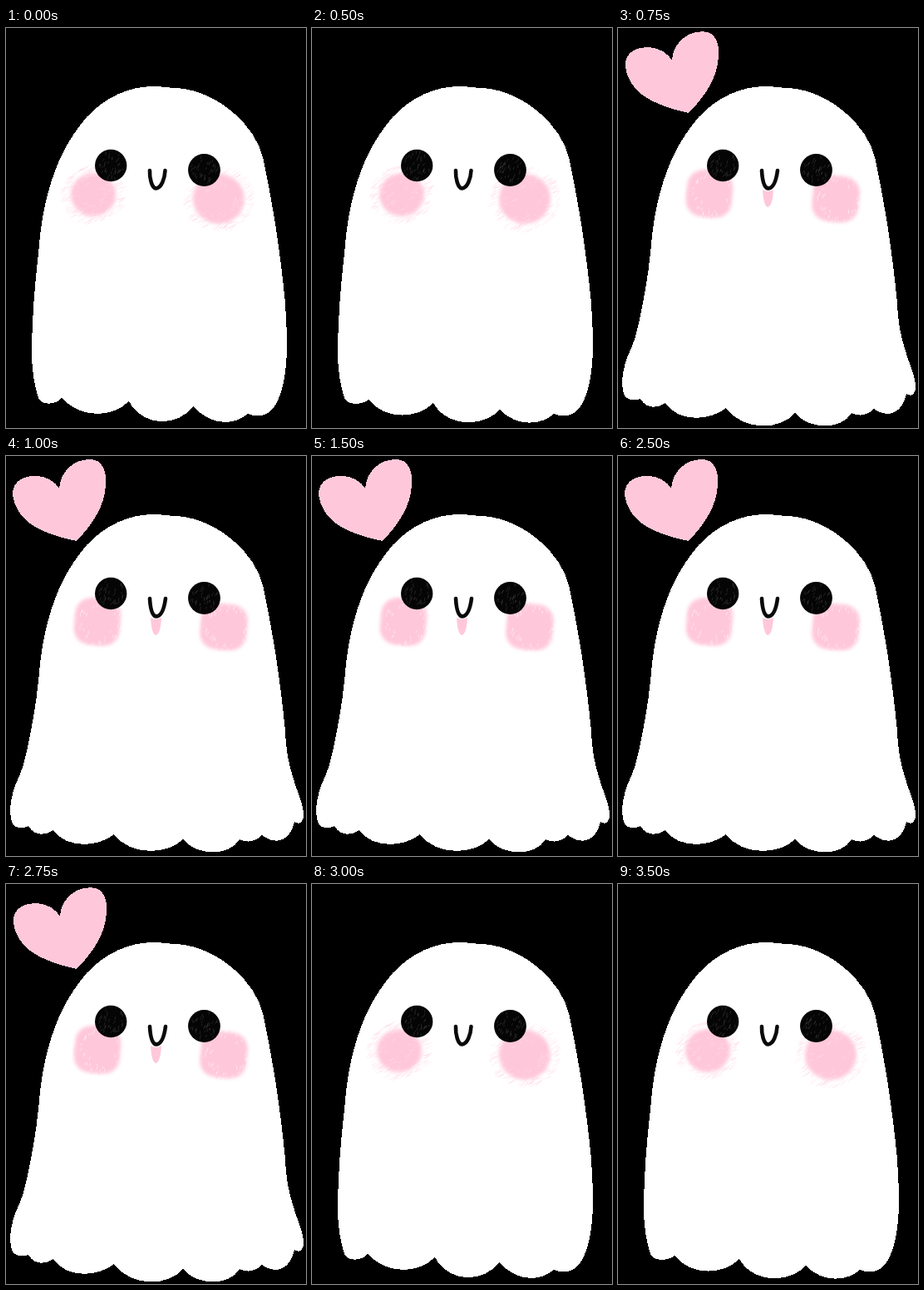
These frames come from a looping animation (361 px wide and 480 px high, 3.75 s). An HTML page:

```html
<!DOCTYPE html>
<html lang="en">
<head>
<meta charset="utf-8">
<title>Little ghost</title>
<style>
html, body { margin: 0; width: 100%; height: 100%; overflow: hidden; background: #000; }
svg { display: block; width: 100vw; height: 100vh; }
</style>
</head>
<body>
<svg id="stage" viewBox="0 0 361 480" preserveAspectRatio="none">
  <defs>
    <filter id="soft" x="-20%" y="-20%" width="140%" height="140%"><feGaussianBlur stdDeviation="2"/></filter>
  </defs>
</svg>
<script>
const STEP = 250;
const ORDER = [0, 1, 2, 3, 4, 5, 4, 3, 4, 5, 4, 3, 0, 1, 2];
const PINK = '#ffc8da';
const stage = document.getElementById('stage');

function add(parent, tag, attrs) {
  const el = document.createElementNS('http://www.w3.org/2000/svg', tag);
  for (const k in attrs) el.setAttribute(k, attrs[k]);
  parent.appendChild(el);
  return el;
}

function random(seed) {
  return () => {
    seed = (seed * 1664525 + 1013904223) >>> 0;
    return seed / 4294967296;
  };
}

// Many short slanted marks, joined into one path.
function marks(parent, seed, count, place, len, slant, style) {
  const rnd = random(seed);
  let d = '';
  for (let i = 0; i < count; i++) {
    const [x, y] = place(rnd);
    const a = slant + (rnd() - 0.5) * 0.7;
    const l = len * (0.4 + rnd() * 0.6);
    const dx = Math.cos(a) * l / 2, dy = Math.sin(a) * l / 2;
    d += `M${(x - dx).toFixed(1)} ${(y - dy).toFixed(1)}L${(x + dx).toFixed(1)} ${(y + dy).toFixed(1)}`;
  }
  add(parent, 'path', { d, fill: 'none', 'stroke-linecap': 'round', ...style });
}

const inDisc = (cx, cy, rx, ry, from = 0) => rnd => {
  const a = rnd() * Math.PI * 2;
  const r = from + (1 - from) * Math.sqrt(rnd());
  return [cx + Math.cos(a) * rx * r, cy + Math.sin(a) * ry * r];
};

function eye(g, cx, cy, r, seed) {
  add(g, 'circle', { cx, cy, r, fill: '#050505' });
  marks(g, seed, 36, inDisc(cx, cy, r * 0.85, r * 0.85), 4, -1.2,
    { stroke: '#777', 'stroke-width': 0.6, 'stroke-opacity': 0.45 });
}

function fuzzyCheek(g, cx, cy, r, seed) {
  add(g, 'ellipse', { cx, cy, rx: r, ry: r - 1, fill: PINK, filter: 'url(#soft)' });
  marks(g, seed, 130, inDisc(cx, cy, r + 10, r + 7, 0.68), 10, -0.6,
    { stroke: PINK, 'stroke-width': 0.9, 'stroke-opacity': 0.33 });
  marks(g, seed + 9, 40, inDisc(cx, cy, r, r, 0.3), 5, -0.6,
    { stroke: '#fff', 'stroke-width': 0.7, 'stroke-opacity': 0.35 });
}

function squareCheek(g, cx, cy, w, h, seed) {
  add(g, 'rect', { x: cx - w / 2, y: cy - h / 2, width: w, height: h, rx: 19,
    transform: `rotate(5 ${cx} ${cy})`, fill: PINK, filter: 'url(#soft)' });
  marks(g, seed, 50, inDisc(cx, cy, w / 2, h / 2, 0.85), 6, -1.3,
    { stroke: PINK, 'stroke-width': 1, 'stroke-opacity': 0.4 });
  marks(g, seed + 5, 34, inDisc(cx + 4, cy, w * 0.48, h * 0.48, 0.6), 4, -1.3,
    { stroke: '#fff', 'stroke-width': 0.8, 'stroke-opacity': 0.6 });
}

const HEAD = 'M39 270C41 245 44 222 50 200C61 158 76 132 97 107C119 83 148 70 178 70' +
  'C188 70 196 72 206 72C232 74 256 86 275 103C293 119 304 136 309 155' +
  'C314 178 319 205 324 235C330 275 333 300 336 330';

const calmRight = 'C337 350 338 362 338 380C338 412 332 467 303 465Q296 465 291 463';
const calmLeft = x => `C60 452 46 453 40 446C${x + 3} 432 ${x} 410 ${x} 388C${x} 350 35 305 39 270Z`;
const wideRight = 'C337 362 344 382 350 400C354 412 358 420 358 430C358 440 353 443 347 439';
const wideLeft = x => `C22 447 10 448 7 439C${x - 2} 424 ${x + 1} 411 11 395` +
  'C20 378 22 366 26 350C31 325 36 300 39 270Z';

const SKIRTS = [
  calmRight + 'C272 478 247 477 225 454C206 480 164 478 148 448C126 469 89 468 67 444' + calmLeft(31),
  calmRight + 'C272 478 247 477 226 456C207 480 165 479 147 449C126 469 89 469 67 445' + calmLeft(29),
  calmRight + 'C276 477 246 479 226 458C207 479 163 480 146 450C126 470 87 470 68 446' + calmLeft(31),
  wideRight + 'C341 466 322 467 308 457C299 466 289 466 281 462C270 482 230 483 213 462' +
    'C194 484 149 483 130 456C107 474 70 471 57 450C46 457 34 457 27 445' + wideLeft(5),
  wideRight + 'C341 465 322 466 308 455C299 464 289 464 281 460C270 480 230 481 213 460' +
    'C194 479 149 480 130 454C107 472 70 469 57 449C46 456 34 456 27 444' + wideLeft(5),
  wideRight + 'C341 464 322 466 308 455C299 464 289 464 281 459C270 479 230 480 213 460' +
    'C194 480 149 479 130 453C107 472 70 468 57 448C46 455 34 455 27 443' + wideLeft(4)
];

const HEART = 'M85 102C60 97 33 88 20 73C11 62 5 47 10 36C14 27 26 23 38 24' +
  'C50 25 59 31 64 39C65 20 80 4 101 4C116 4 121 18 120 34C119 60 104 82 85 102Z';

const poses = SKIRTS.map((skirt, i) => {
  const g = add(stage, 'g', { visibility: 'hidden' });
  const happy = i > 2, n = i % 3;
  const cut = { 'shape-rendering': 'crispEdges' };
  const ink = { fill: 'none', stroke: '#0a0a0a', 'stroke-width': 4.6, 'stroke-linecap': 'round', 'stroke-linejoin': 'round' };
  add(g, 'path', { d: HEAD + skirt, fill: '#fff', ...cut });
  if (happy) {
    squareCheek(g, 110, 199, 55, 56, 40 + i);
    squareCheek(g, 262, 205, 56, 55, 60 + i);
    add(g, 'path', { d: 'M174 194Q180 198 187 194Q186 214 180 215Q175 213 174 194Z', fill: PINK });
    add(g, 'path', { d: HEART, fill: PINK, transform: `rotate(${[0.8, 0, -0.6][n]} 85 102)`, ...cut });
  } else {
    fuzzyCheek(g, [105, 106, 108][n], 200, 27, 11 + i);
    fuzzyCheek(g, 256, 205, 31, 27 + i);
  }
  eye(g, 126.2, 165, 19.2, happy ? 3 : 5 + n);
  eye(g, 238.5, 170.5, 19.4, happy ? 8 : 12 + n);
  add(g, 'path', { d: happy
    ? 'M173 171C173.5 180 175 192 181 192.5C187 192 190.5 182 192 171'
    : 'M173 171C172.5 180 175.5 192 180.5 192.5C187 192 191 181 191.5 171', ...ink });
  return g;
});

let shown = -1;
function draw(ms) {
  const next = ORDER[Math.floor(ms / STEP) % ORDER.length];
  if (next === shown) return;
  shown = next;
  poses.forEach((g, i) => g.setAttribute('visibility', i === next ? 'visible' : 'hidden'));
}

const start = performance.now();
function tick() {
  draw(performance.now() - start);
  requestAnimationFrame(tick);
}
tick();
</script>
</body>
</html>
```
